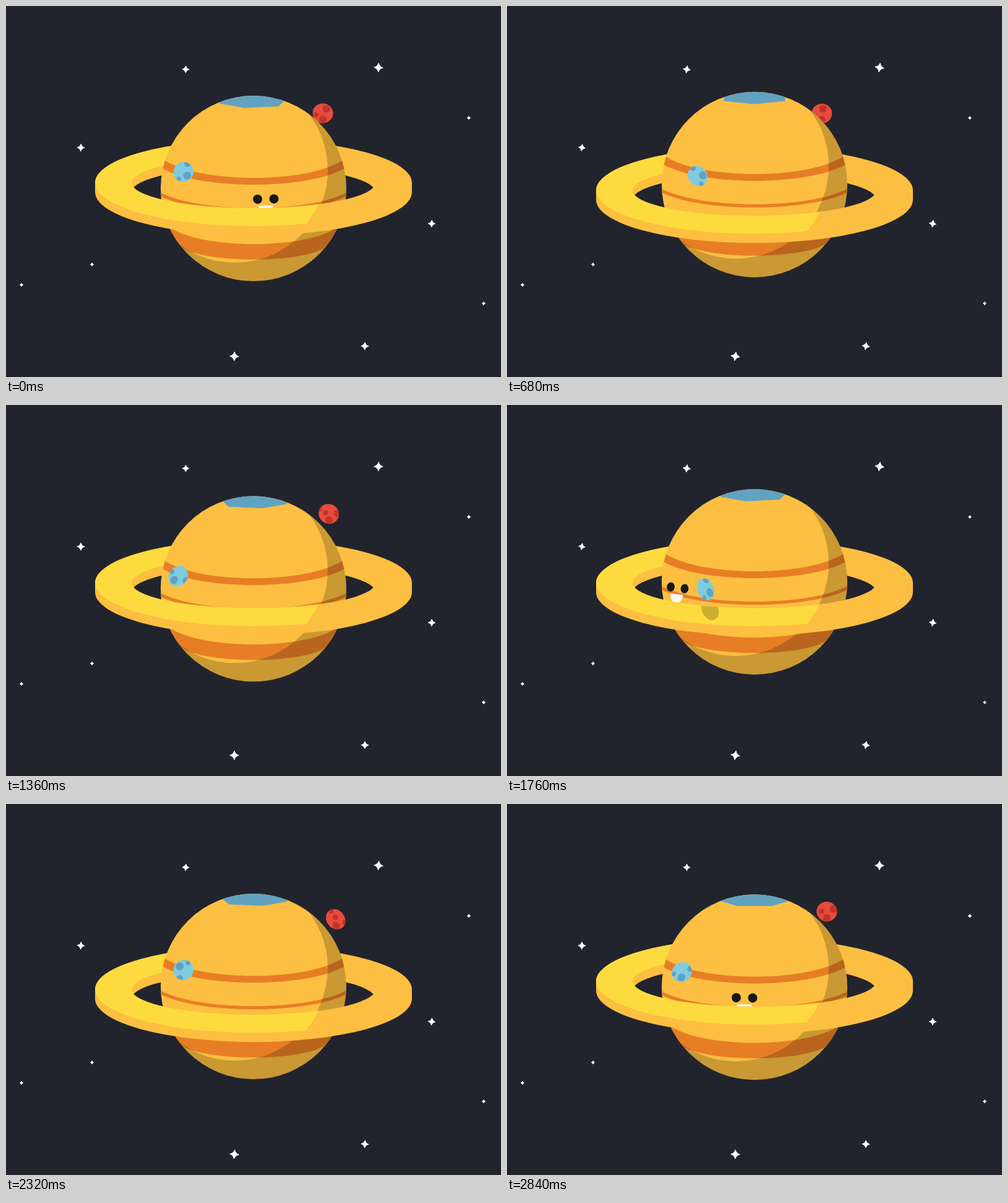
These frames come from a looping animation (800x600 px, 2.88 s). An HTML page with a canvas:

```html
<!DOCTYPE html>
<html lang="en">
<head>
<meta charset="utf-8">
<title>Bouncing moons</title>
<style>
  html, body { margin: 0; width: 100%; height: 100%; overflow: hidden; background: #22242d; }
  canvas { display: block; }
</style>
</head>
<body>
<canvas id="stage" width="800" height="600"></canvas>
<script>
const ctx = document.getElementById('stage').getContext('2d');
const LOOP = 2880, STEP = 40, HALF = 720, TAU = Math.PI * 2, DEG = Math.PI / 180;
const COLOR = {
  sky: '#22242d', planet: '#fcbf41', band: '#e77e25', shade: 'rgba(0,0,0,.2)',
  ring: '#fddb3f', cap: '#62a2c1', eye: '#17171b',
};

// x, y, radius, direction of the size pulse
const STARS = [
  [290.5, 102.5, 6, 1], [602, 99.5, 7.5, 0], [748, 181, 2.9, -1], [121, 229, 6, -1],
  [688, 352, 6, 0], [139, 418, 2.9, 0], [25, 451, 2.9, 0], [772, 481, 2.9, -1],
  [580, 550, 6.3, 0], [369, 566.5, 7.5, 0],
];
const STAR = new Path2D('M0 -1Q.2 -.2 1 0Q.2 .2 0 1Q-.2 .2 -1 0Q-.2 -.2 0 -1Z');

const RING = {
  annulus: new Path2D('M144 0A256 70 0 0 1 656 0V15H597A197 41 0 0 0 203 15H144Z'),
  backTop: new Path2D('M400 -70A256 70 0 0 0 144 0V1H203V0A197 41 0 0 1 400 -41Z'),
  front: new Path2D('M144 0V15A256 70 0 0 0 656 15V0H597A197 41 0 0 1 203 0Z'),
  frontTop: new Path2D('M144 -2V0A256 70 0 0 0 485 66Q498 50 505 34.7A197 41 0 0 1 203 0V-2Z'),
};

// end x, end y and middle y of the upper edge, then of the lower edge
const BANDS = [
  [143, -45, -17, 146.5, -32, -6],
  [149.8, 7, 32, 149.5, 13, 37],
  [137, 62, 90, 117, 94, 115],
].map(([x1, y1, m1, x2, y2, m2]) => {
  const c1 = y1 + (m1 - y1) * 4 / 3, c2 = y2 + (m2 - y2) * 4 / 3;
  return new Path2D(`M-170 ${y1}H${-x1}C-85 ${c1} 85 ${c1} ${x1} ${y1}H170V${y2}
    H${x2}C85 ${c2} -85 ${c2} ${-x2} ${y2}H-170Z`);
});
const MOUTH = new Path2D('M-12 0H12C12 9 6 15 0 15S-12 9 -12 0Z');

// Craters as x, y, radius
const BLUE = { body: '#80cbdf', dark: '#5fa3c0', craters: [[6, 6, 6.3], [6, -13, 5], [-7, 11, 3.6]] };
const RED = { body: '#e84b3d', dark: '#c0352b', pivot: 10,
  craters: [[0, 0, 6], [0, -13, 4.3], [17, -5, 6], [-7, -23, 5]] };

const wave = (t, peak) => Math.cos((t - peak) / (2 * HALF) * TAU);

function within(draw) {
  ctx.save();
  draw();
  ctx.restore();
}

function fill(path, color) {
  ctx.fillStyle = color;
  ctx.fill(path);
}

function disc(x, y, rx, color, ry = rx) {
  ctx.beginPath();
  ctx.ellipse(x, y, rx, ry, 0, 0, TAU);
  ctx.fillStyle = color;
  ctx.fill();
}

// One hop to the far side and back; each hop is a parabola.
function hop(t, start, x0, vx, apex, top, gravity) {
  const s = (t - start + 2 * LOOP) % (2 * HALF);
  const dir = s < HALF ? 1 : -1;
  const d = dir > 0 ? s : 2 * HALF - s;
  const vy = 2 * gravity * (d - apex);
  const speed = Math.min(Math.hypot(vx, vy), .3) - .11;
  return {
    d, dir, vy,
    x: x0 + vx * d,
    y: top + gravity * (d - apex) ** 2,
    heading: Math.atan2(vy * dir, vx * dir),
    long: 16.4 + 12 * speed,
    short: 16.2 - 18 * speed,
  };
}

function drawMoon(m, look, spin) {
  within(() => {
    ctx.translate(m.x, m.y);
    ctx.rotate(m.heading);
    ctx.scale(m.long / 16, m.short / 16);
    ctx.rotate(-m.heading);
    disc(0, 0, 16, look.body);
    ctx.clip();
    ctx.translate(0, look.pivot || 0);
    ctx.rotate(spin);
    look.craters.forEach(([x, y, r]) => disc(x, y, r, look.dark));
  });
}

function drawStars(t) {
  STARS.forEach(([x, y, r, pulse]) => within(() => {
    const size = (r - .6) * (1 + .09 * pulse * wave(t, 440));
    ctx.translate(x, y);
    ctx.rotate((5 + 5 * wave(t, 500)) * DEG);
    ctx.scale(size, size);
    fill(STAR, '#fff');
    ctx.strokeStyle = '#fff';
    ctx.lineJoin = 'round';
    ctx.lineWidth = 1.3 / size;
    ctx.stroke(STAR);
  }));
}

function drawCap(t) {
  ctx.beginPath();
  for (let i = 0; i < 6; i++) {
    const a = (45 + t * .375 + i * 60) * DEG, depth = Math.cos(a);
    ctx.lineTo(57 * Math.sin(a), -140 + depth * (depth < 0 ? 25 : 10));
  }
  ctx.fillStyle = COLOR.cap;
  ctx.fill();
}

function drawFace(t) {
  const x = 19.8 + .9 * ((t + 480) % 960 - 480);
  if (Math.abs(x) > 180) return;
  within(() => {
    ctx.translate(x, 17.3 - .0005 * x * x);
    ctx.rotate(Math.atan(-.001 * x));
    ctx.scale(1 - .15 * (x / 123) ** 2, 1);
    disc(-13.3, 0, 7.5, COLOR.eye);
    disc(13.3, 0, 7.5, COLOR.eye);
    ctx.translate(0, 10.5);
    fill(MOUTH, '#f7f7f7');
  });
}

function drawPlanet(t) {
  within(() => {
    ctx.translate(400, 292.5 + 7.5 * wave(t, 1160));
    disc(0, 0, 150, COLOR.planet);
    ctx.clip();
    drawCap(t);
    BANDS.forEach(band => fill(band, COLOR.band));
    ctx.beginPath();
    ctx.rect(-160, -160, 320, 320);
    ctx.arc(-30, -30, 150, 0, TAU);
    ctx.fillStyle = COLOR.shade;
    ctx.fill('evenodd');
    drawFace(t);
  });
}

function drawRingBack(y) {
  within(() => {
    ctx.translate(0, y);
    fill(RING.annulus, COLOR.planet);
    fill(RING.backTop, COLOR.ring);
  });
}

function drawRingFront(y, moon) {
  within(() => {
    ctx.translate(0, y);
    fill(RING.front, COLOR.planet);
    fill(RING.frontTop, COLOR.ring);
    ctx.clip(RING.frontTop);
    ctx.translate(moon.x + 19 * Math.cos(moon.heading), moon.y - y + 35 * Math.sin(moon.heading));
    ctx.rotate(moon.heading);
    disc(0, 0, moon.long, COLOR.shade, moon.short);
  });
}

function draw(t) {
  const ringY = 292.5 + 7.5 * wave(t, 840);
  const blue = hop(t, 1160, 257, .1065, 347, 266.1, .0005);
  const red = hop(t, 1074, 556, -.12, 360, 173.4, .00047);
  const blueSpin = (-1.175 * (blue.d - 280) + (blue.dir < 0 ? 180 : 0)) * DEG;
  const redSpin = Math.atan2(-red.vy, .12) - 53 * DEG;

  ctx.fillStyle = COLOR.sky;
  ctx.fillRect(0, 0, 800, 600);
  drawStars(t);
  drawRingBack(ringY);
  drawMoon(red, RED, redSpin);
  drawPlanet(t);
  drawRingFront(ringY, blue);
  drawMoon(blue, BLUE, blueSpin);
}

const begin = performance.now();
function tick() {
  const t = Math.max(0, performance.now() - begin) % LOOP;
  draw(Math.floor(t / STEP) * STEP);
  requestAnimationFrame(tick);
}
tick();
</script>
</body>
</html>
```
